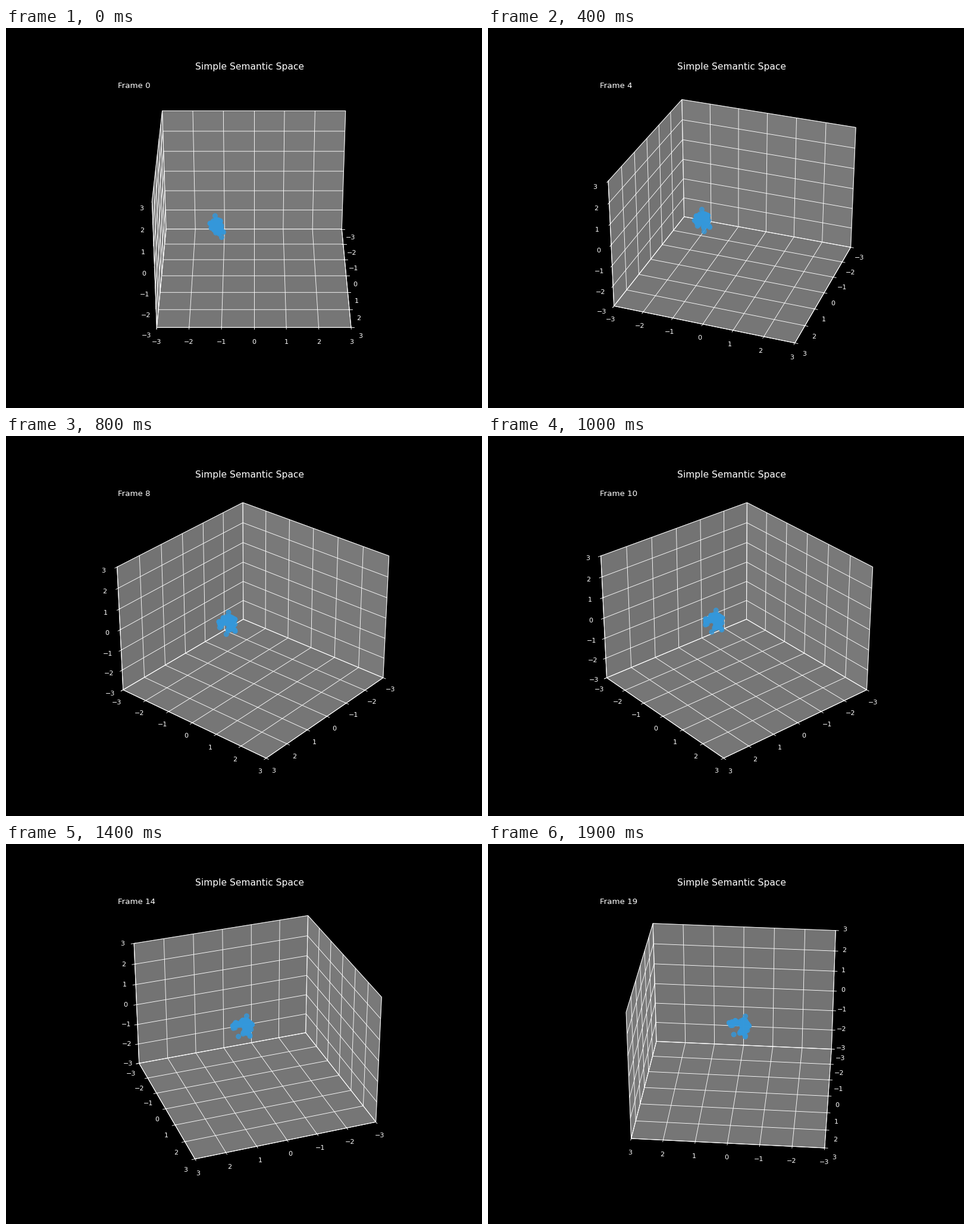
Write a matplotlib script that moves like this. It is 800 px wide and 640 px high and loops after 2 s.

```python
import numpy as np
import matplotlib.pyplot as plt
from matplotlib.animation import FuncAnimation

FRAMES = 20
STEP = 5          # degrees of camera turn per frame
BLUE = "#3498db"

# Key points of the cluster: a tall body, an arm and one stray point
TOP, LEFT = (-.20, -1.24, -.15), (-.12, -1.40, -.46)
RIGHT, LOW, BASE = (-.33, -1.08, -.50), (-.22, -.98, -.98), (-.03, -1.11, -.91)
TIP, ELBOW, SHOULDER = (.32, -1.12, -.42), (.27, -1.21, -.62), (.14, -1.36, -.48)
STRAY = (.16, -1.03, -.93)


def blend(rng, keys, n):
    """The key points and n random mixes of them."""
    keys = np.array(keys)
    return np.vstack([keys, rng.dirichlet(np.full(len(keys), 0.5), n) @ keys])


def cluster():
    rng = np.random.default_rng(7)
    body = blend(rng, [TOP, LEFT, RIGHT, LOW, BASE], 55)
    arm = blend(rng, [TIP, ELBOW, SHOULDER, LEFT, RIGHT], 30)
    return np.vstack([body, arm, STRAY])


plt.style.use("dark_background")
fig = plt.figure(figsize=(10, 8), dpi=80)
ax = fig.add_subplot(projection="3d")
ax.set(xlim=(-3, 3), ylim=(-3, 3), zlim=(-3, 3))
ax.set_title("Simple Semantic Space", fontsize=14)
ax.scatter(*cluster().T, c=BLUE, s=50, alpha=0.8)
label = ax.text2D(0.05, 0.95, "", transform=ax.transAxes, fontsize=12)


def update(i):
    ax.view_init(elev=30, azim=STEP * i)
    label.set_text(f"Frame {i}")
    return (label,)


anim = FuncAnimation(fig, update, frames=FRAMES, interval=100,
                     init_func=lambda: update(0), repeat=True, repeat_delay=0)
plt.show()
```
